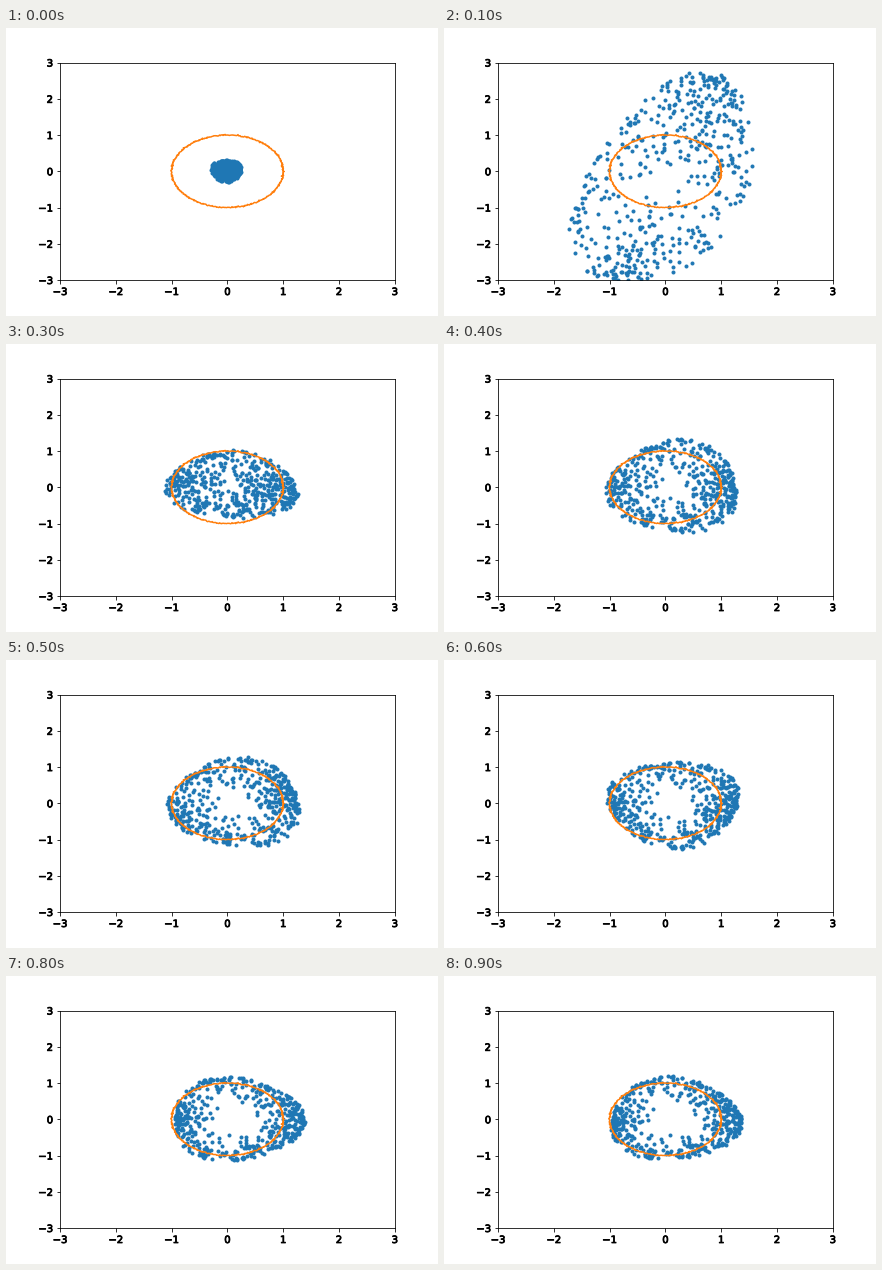
Recreate the animation shown at these times as a matplotlib script. Size 432x288 px, loop 1 s.

```python
import numpy as np
import matplotlib.pyplot as plt
from matplotlib.animation import FuncAnimation
from matplotlib.patheffects import withStroke

DPI = 72
FRAMES, INTERVAL = 10, 100
COUNT = 500
TAU = 2 * np.pi

rng = np.random.default_rng(12)
phase = TAU * rng.random(COUNT)
depth = rng.random(COUNT)

# Shape: center x, center y, half length, half width, tilt, clumping, hollowness
BLOB = np.array([-.02, .02, .27, .30, 0, 0, .5])
BURST = np.array([0, -.3, 3, 1.45, np.radians(73), .5, .33])
LENS = np.array([0, .08, 1.2, .57, np.radians(-15), .4, .45])


def settling_ring(frame):
    """Ring that grows thinner while its two clumps swing and calm down."""
    age = frame - 4
    calm = np.exp(-age / 4)
    swing = .45 * calm * np.sin(age * np.pi / 2)
    return np.array([.15, 0, 1.17, 1.08 + .2 * calm,
                     swing, .45, .15 + .13 * calm])


def shape_at(frame):
    if frame < 3:
        return (BLOB, BURST, LENS)[frame]
    if frame == 3:
        return (LENS + settling_ring(4)) / 2
    return settling_ring(frame)


def points_at(frame):
    x, y, length, width, tilt, clump, hollow = shape_at(frame)
    angle = phase - clump / 2 * np.sin(2 * phase)
    radius = depth ** hollow * (1 + .06 * np.sin(3 * angle + frame))
    along = length * radius * np.cos(angle)
    across = width * radius * np.sin(angle)
    return (x + along * np.cos(tilt) - across * np.sin(tilt),
            y + along * np.sin(tilt) + across * np.cos(tilt))


fig, ax = plt.subplots(figsize=(432 / DPI, 288 / DPI), dpi=DPI)
fig.subplots_adjust(left=.125, right=.9, bottom=.125, top=.88)
ax.set(xlim=(-3, 3), ylim=(-3, 3), xticks=range(-3, 4), yticks=range(-3, 4))
for label in ax.get_xticklabels() + ax.get_yticklabels():
    label.set_path_effects([withStroke(linewidth=.8, foreground="black")])

theta = np.linspace(0, TAU, COUNT)
rough = 1 + rng.normal(0, .008, COUNT)
dots, = ax.plot([], [], ".", color="#1f77b4")
ax.plot(rough * np.cos(theta), rough * np.sin(theta), color="#ff7f0e", lw=1.5)


def update(frame):
    dots.set_data(*points_at(frame))
    return dots,


animation = FuncAnimation(fig, update, frames=FRAMES, interval=INTERVAL,
                          repeat=True, repeat_delay=0)
plt.show()
```
